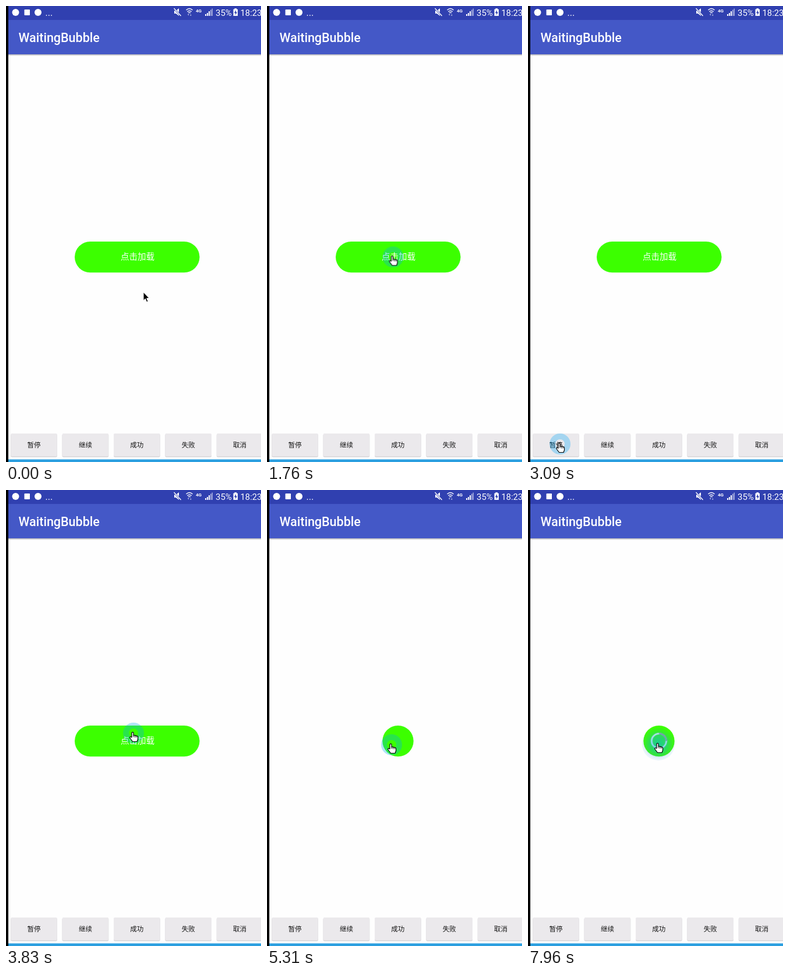
These frames come from a looping animation (438 by 784 pixels, 8000 ms). An HTML page:

```html
<!DOCTYPE html>
<html lang="zh">
<head>
<meta charset="utf-8">
<title>Loading demo</title>
<style>
html, body { margin: 0; width: 100%; height: 100%; overflow: hidden; background: #fefefe; }
svg { display: block; width: 438px; height: 784px; }
text { font-family: Roboto, "Noto Sans CJK SC", "Noto Sans CJK", sans-serif; fill: #fff; }
.mid { text-anchor: middle; }
.key text { font-size: 11.5px; fill: #161616; }

.pill, .label, .loader, .cursor, .arrow, .hand, .spot, .halo { animation: 8s step-end infinite; }
.pill { animation-name: shrink; }
.label { animation-name: label; }
.loader { animation-name: loader; }
.cursor { animation-name: move; }
.arrow { animation-name: arrow; }
.hand { animation-name: hand; }
.spot { animation-name: spot; }
.halo { animation-name: halo; }
.progress { animation: progress 8s linear infinite; }

@keyframes shrink {
  0% { x: 118px; width: 214.5px; }
  57.125% { x: 125px; width: 200px; }
  59% { x: 143px; width: 164px; }
  60.875% { x: 167px; width: 116px; }
  62.625% { x: 187px; width: 76px; }
  64.5%, 100% { x: 198.3px; width: 53.4px; }
}
@keyframes label { 0% { opacity: 1; } 57.125%, 100% { opacity: 0; } }
@keyframes loader { 0% { opacity: 0; } 70.125%, 100% { opacity: 1; } }
@keyframes progress {
  0% { stroke-dasharray: 0 100; }
  79.375% { stroke-dasharray: 0 100; animation-timing-function: steps(11); }
  99.5%, 100% { stroke-dasharray: 25 100; }
}
@keyframes arrow { 0% { opacity: 1; } 22%, 100% { opacity: 0; } }
@keyframes hand { 0% { opacity: 0; } 22%, 100% { opacity: 1; } }
@keyframes spot {
  0% { opacity: 1; }
  55.25% { opacity: 0; }
  57.125% { opacity: 1; }
  99.5%, 100% { opacity: 0; }
}
@keyframes halo {
  0% { opacity: 0; }
  55.25% { opacity: 1; }
  57.125% { opacity: 0; }
  99.5%, 100% { opacity: 1; }
}
@keyframes move {
  0% { transform: translate(236px, 492px); }
  1.875% { transform: translate(232px, 470px); }
  3.75% { transform: translate(227px, 440px); }
  5.625% { transform: translate(224px, 422px); }
  9.25% { transform: translate(221px, 424px); }
  11% { transform: translate(217px, 427px); }
  12.875% { transform: translate(214.5px, 429px); }
  22% { transform: translate(216.5px, 431.5px); }
  27.625% { transform: translate(204px, 470px); }
  29.5% { transform: translate(150px, 595px); }
  31.375% { transform: translate(99px, 698px); }
  33.25% { transform: translate(75px, 735px); }
  35% { transform: translate(62px, 748px); }
  36.875% { transform: translate(57px, 752px); }
  38.625% { transform: translate(55px, 753px); }
  42.375% { transform: translate(62px, 738px); }
  44.25% { transform: translate(105px, 645px); }
  46% { transform: translate(180px, 490px); }
  47.875% { transform: translate(219px, 418px); }
  49.75% { transform: translate(217px, 428px); }
  51.5% { transform: translate(214px, 438px); }
  70.125% { transform: translate(215px, 445px); }
  72% { transform: translate(218px, 456px); }
  73.75% { transform: translate(221px, 452px); }
  75.625% { transform: translate(223px, 442px); }
  77.5%, 100% { transform: translate(224px, 437px); }
}
</style>
</head>
<body>
<svg viewBox="0 0 438 784">
  <defs>
    <linearGradient id="shade" x2="0" y2="1">
      <stop stop-color="#a9a9b0"/><stop offset="1" stop-color="#fefefe"/>
    </linearGradient>
    <radialGradient id="glow">
      <stop stop-color="#00a9f8" stop-opacity=".6"/>
      <stop offset=".5" stop-color="#10a0f0" stop-opacity=".4"/>
      <stop offset=".9" stop-color="#2090e0" stop-opacity=".1"/>
      <stop offset="1" stop-color="#2090e0" stop-opacity=".09"/>
    </radialGradient>
  </defs>

  <rect width="438" height="784" fill="#fefefe"/>
  <rect y="83" width="438" height="3" fill="url(#shade)"/>
  <rect y="24" width="438" height="59" fill="#4458c7"/>
  <rect width="438" height="24" fill="#3040b0"/>
  <text x="21.5" y="62" font-size="21.5" font-weight="500">WaitingBubble</text>

  <g fill="#fff">
    <circle cx="16.5" cy="11" r="6"/>
    <rect x="31.5" y="6" width="9.5" height="10" rx="1"/>
    <circle cx="55" cy="11" r="6"/>
    <text x="67.5" y="16.5" font-size="16">...</text>
    <path d="M289 8h3l5-4v13l-5-4h-3z"/>
    <path d="M288.5 4l12 13" stroke="#3040b0" stroke-width="3"/>
    <path d="M288.5 4l12 13" stroke="#fff" stroke-width="1.4"/>
    <path d="M309.5 7q5.500-5 11 0M311.300 9.700q3.700-3 7.400 0M313 12q2-1.600 4 0" fill="none" stroke="#fff" stroke-width="1.4"/>
    <path d="M312 14h2.500l-1.200 2.500zM316 16.500h2.500l-1.200-2.500z" opacity=".75"/>
    <text x="326" y="10.500" font-size="8" font-weight="700">4G</text>
    <path d="M342 17v-3h2v3zM345 17v-5h2v5zM348 17v-8h2v8z"/>
    <path d="M351 17V6.500h1.700V17zM353.500 17V4.500h1.500V17z" opacity=".6"/>
    <text x="360" y="17" font-size="15">35%</text>
    <path d="M392.500 4h3.500v1.500h2V17h-7.500V5.500h2z"/>
    <path d="M395 7l-3 5h2v3.500l3-5h-2z" fill="#3040b0"/>
    <text x="402.500" y="17" font-size="14.800">18:23</text>
  </g>

  <g id="keys"></g>
  <rect y="779.500" width="438" height="4.500" fill="#2b9fe0"/>
  <rect width="4" height="784" fill="#000"/>

  <rect class="pill" x="118" y="405" width="214.500" height="53.200" rx="26.600" fill="#3cff00"/>
  <text class="label mid" x="226" y="436.300" font-size="14.500">点击加载</text>
  <g class="loader" fill="none" stroke-width="2.600" transform="rotate(-90 225 431.500)">
    <circle cx="225" cy="431.500" r="12.600" stroke="#fff"/>
    <circle class="progress" cx="225" cy="431.500" r="12.600" stroke="#999" pathLength="100"/>
  </g>

  <g class="cursor">
    <path class="arrow" d="M0 0V14.500L3.300 11.300 5.600 17 8 16 5.700 10.500H10Z" fill="#000" stroke="#fff"/>
    <g class="hand">
      <circle class="spot" r="13" fill="none" stroke="#00a9f8" stroke-opacity=".3" stroke-width="10"/>
      <circle class="halo" r="28" fill="url(#glow)"/>
      <g stroke="#000" stroke-width="1.200" stroke-linejoin="round">
        <path fill="#fff" d="M-3 7.600V0q0-1.600 1.500-1.600T0 0V4q1.500-.9 2.600.4 1.500-.8 2.500.5Q7.500 4.600 7.500 7v3.500L6 14.500H-1.500L-6 8.500q-.8-1.600 .6-2.100T-3 7.600"/>
        <path fill="none" d="M0 4v3M2.600 4.800v2.700M5.100 5.200v2.500" stroke-width=".9"/>
      </g>
    </g>
  </g>
</svg>
<script>
const key = (name, i) => {
  const x = 8.2 + i * 88.4;
  return `<g class="key">
    <rect x="${x}" y="736" width="79.600" height="39.500" rx="2" fill="#c9c8cb"/>
    <rect x="${x}" y="735" width="79.600" height="39.500" rx="2" fill="#ebe9ec"/>
    <text class="mid" x="${x + 39.8}" y="759">${name}</text></g>`;
};
document.getElementById("keys").innerHTML =
  ["暂停", "继续", "成功", "失败", "取消"].map(key).join("");
</script>
</body>
</html>
```
